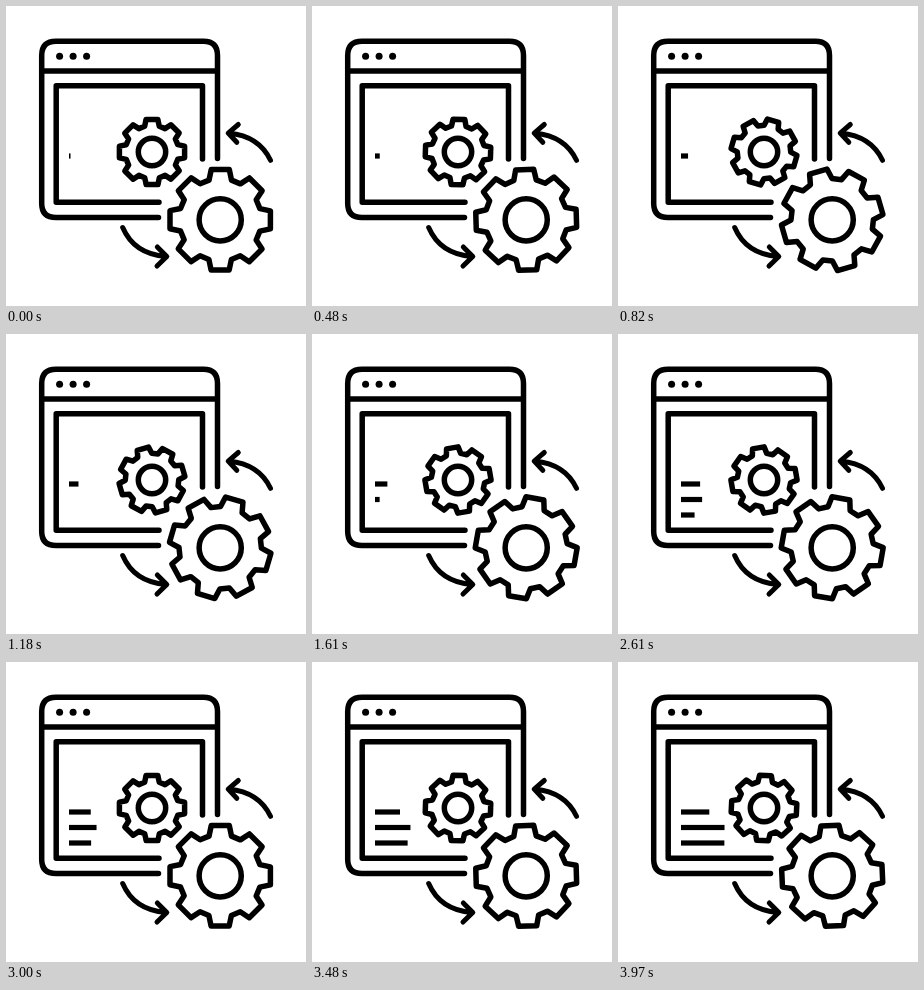
An HTML page that plays this animation: 300 px wide and 300 px high, repeating every 4000 ms.

```html
<!DOCTYPE html>
<html lang="en">
<head>
<meta charset="utf-8">
<title>Window with turning gears</title>
<style>
html, body { margin: 0; width: 100%; height: 100%; overflow: hidden; background: #fff; }
svg { display: block; width: 100vw; height: 100vh; }
</style>
</head>
<body>
<svg viewBox="0 0 300 300" fill="none" stroke="#000" stroke-width="5.5" stroke-linecap="round" stroke-linejoin="round">
  <path d="M152.5 211.5H50Q35.7 211.5 35.7 197.5V49.5Q35.7 35.3 50 35.3H197.5Q211.5 35.3 211.5 49.5V152.5M36 65H211.5"/>
  <path d="M153 196.3H50.2V79.8H196.5V153"/>
  <g fill="#000" stroke="none">
    <circle cx="53.6" cy="50.2" r="3.5"/>
    <circle cx="67.1" cy="50.2" r="3.5"/>
    <circle cx="80.6" cy="50.2" r="3.5"/>
  </g>
  <g stroke-width="5">
    <path d="M264.5 154.3Q253 130 223 127.3M232.3 118.5L222.2 127.1L230.8 136.3"/>
    <path d="M116.7 221.5Q128 248 160 250.5M151.3 241L160.8 250.5L151 260"/>
  </g>
  <g id="lines" fill="#000" stroke="none"></g>
  <g id="gears"></g>
</svg>
<script>
const LOOP = 4000;

function add(parent, tag, attrs) {
  const el = document.createElementNS('http://www.w3.org/2000/svg', tag);
  for (const key in attrs) el.setAttribute(key, attrs[key]);
  parent.append(el);
  return el;
}

// Eight tapered teeth joined by straight valleys.
function gearPath(radius) {
  const tooth = [[-11.2, -39.5], [-9, -50], [9, -50], [11.2, -39.5]];
  const points = [];
  for (let i = 0; i < 8; i++) {
    const a = i * Math.PI / 4, c = Math.cos(a), s = Math.sin(a), k = radius / 50;
    for (const [x, y] of tooth) points.push([k * (x * c - y * s), k * (x * s + y * c)]);
  }
  return 'M' + points.map(p => p.map(v => v.toFixed(2))).join('L') + 'Z';
}

// The two gears turn in opposite directions.
const gearRoot = document.getElementById('gears');
const gears = [[146, 146, 32.6, -1], [214.2, 213.8, 50.2, 1]].map(([x, y, r, spin]) => {
  add(gearRoot, 'circle', { cx: x, cy: y, r: r * 0.42 });
  return { x, y, spin, el: add(gearRoot, 'path', { d: gearPath(r) }) };
});

// Each line starts as a thin sliver and is complete when the loop ends.
const SLIVER = 1.5;
const lineRoot = document.getElementById('lines');
const lines = [[150, 28.5, 0], [165.5, 44, 1420], [181, 44, 2060]].map(([y, width, start]) => ({
  el: add(lineRoot, 'rect', { x: 63, y: y - 2.6, width: 0, height: 5.2 }),
  width, start
}));

function draw(now) {
  const t = now % LOOP;
  for (const g of gears) {
    g.el.setAttribute('transform', `translate(${g.x} ${g.y}) rotate(${g.spin * 360 * t / LOOP})`);
  }
  for (const l of lines) {
    const progress = (t - l.start) / (LOOP - l.start);
    l.el.setAttribute('width', progress > 0 ? SLIVER + (l.width - SLIVER) * progress : 0);
  }
  requestAnimationFrame(draw);
}
draw(0);
</script>
</body>
</html>
```
